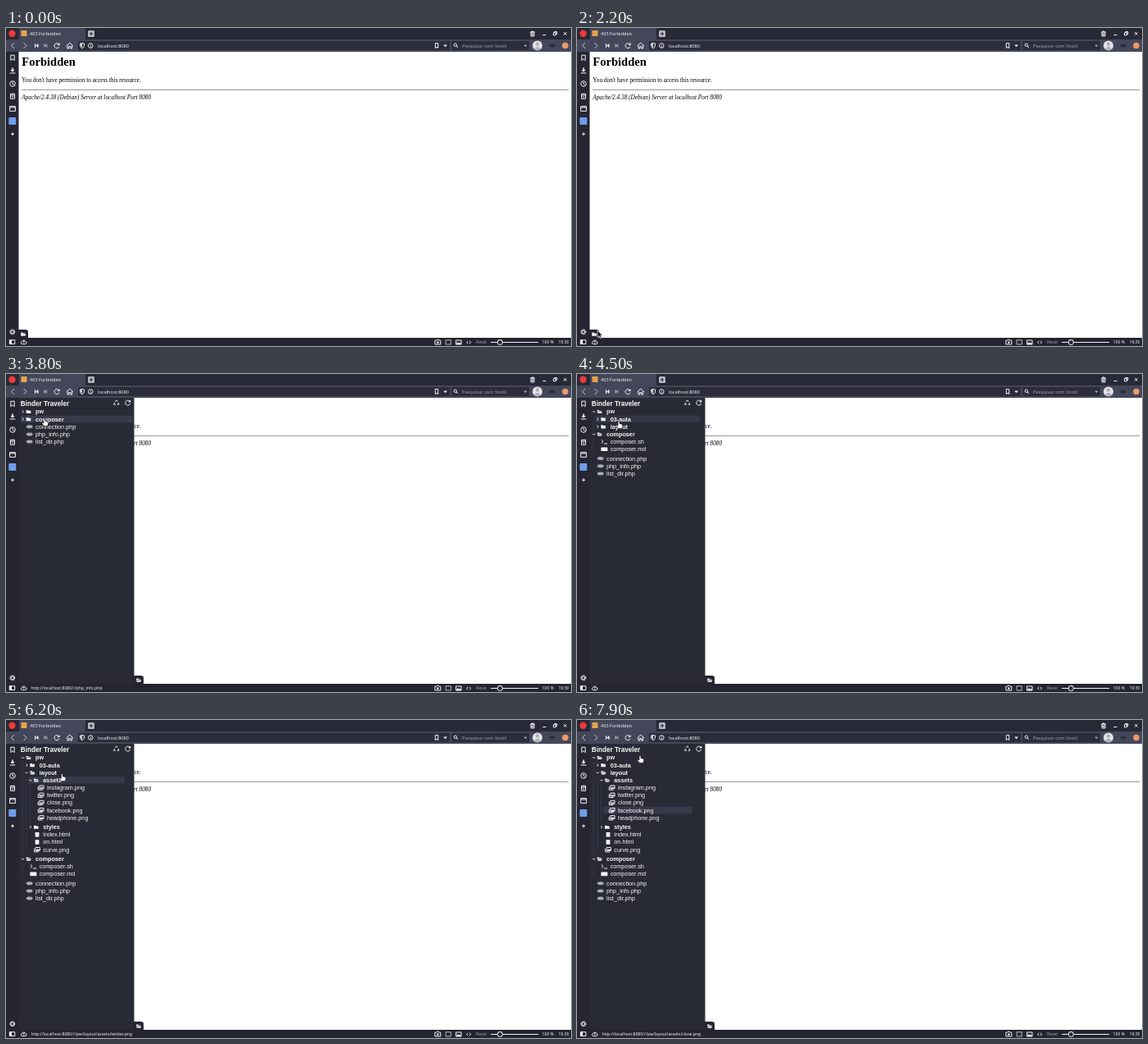
Animation, 690 px wide and 388 px high, one loop 8000 ms. Source, as an HTML page:

```html
<!DOCTYPE html>
<html lang="en">
<head>
<meta charset="utf-8">
<title>403 Forbidden</title>
<style>
html, body { margin: 0; width: 100%; height: 100%; overflow: hidden; background: #fff; }
svg { display: block; }
text { white-space: pre; }
.ui { font-family: "Noto Sans", sans-serif; font-size: 5.6px; fill: #f0f0f4; }
.small { font-size: 5.1px; }
.dim { fill: #a0a2ae; }
.page { font-family: "Liberation Serif", serif; font-size: 7.27px; fill: #000; }
.tree { font-family: "Liberation Sans", sans-serif; font-size: 7.27px; fill: #f8f8f2; }
.b { font-weight: bold; }
.line { fill: none; stroke: #f2f2f5; stroke-width: 1; }
.fill { fill: #f2f2f5; }
</style>
</head>
<body>
<svg width="690" height="388" viewBox="0 0 690 388">
  <rect width="690" height="388" fill="#fff"/>
  <g class="page">
    <text x="19.3" y="46" class="b" style="font-size:14.55px">Forbidden</text>
    <text x="19.3" y="65.6">You don't have permission to access this resource.</text>
    <path d="M19 75.5H687" stroke="#8c8c8c" stroke-width=".9"/>
    <text x="19.3" y="86.5" font-style="italic">Apache/2.4.38 (Debian) Server at localhost Port 8080</text>
  </g>
  <g id="panel"></g>
  <g id="chrome"></g>
  <text id="status" class="ui small" x="30.5" y="385"></text>
  <g id="cursor"></g>
</svg>
<script>
const $ = id => document.getElementById(id);
const line = (d, extra = '') => `<path class="line" d="${d}" ${extra}/>`;
const fill = (d, extra = '') => `<path class="fill" d="${d}" ${extra}/>`;
const rect = (x, y, w, h, color, r = 0) =>
  `<rect x="${x}" y="${y}" width="${w}" height="${h}" rx="${r}" fill="${color}"/>`;
const disc = (x, y, r, color) => `<circle cx="${x}" cy="${y}" r="${r}" fill="${color}"/>`;
const ring = (x, y, r) => `<circle class="line" cx="${x}" cy="${y}" r="${r}"/>`;
const label = (x, y, cls, s) => `<text x="${x}" y="${y}" class="${cls}">${s}</text>`;
const at = (x, y, s) => `<g transform="translate(${x} ${y})">${s}</g>`;

const reload = line('M2.4-1.7A3 3 0 1 0 2.9 1') + fill('M3.6-3.6V-.4H.4Z');
const cloud = line('M-2 2.3H2A1.6 1.6 0 0 0 2.2-.8A2.4 2.4 0 0 0-2.2-.8A1.6 1.6 0 0 0-2 2.3Z');
const folder = fill('M-2.8-2H-.6L.2-1.2H2.8V2.2H-2.8Z');
const openFolder = fill('M-2.8 1.6V-2H-.6L.2-1.2H2.3V-.5H-1.6Z') + fill('M-1.4 0H3.4L2.2 2.2H-2.6Z');
const picture = line('M-1.8-2.6H3.4V1.2H-1.8ZM-3.4-1.2V2.7H2', 'stroke-width=".9"') + fill('M-1.2.8L.2-1L1.2 0L2-.8L3 .8Z');

const fileIcons = {
  php: '<ellipse rx="3.9" ry="2" fill="#a9abb5"/>',
  html: rect(-2.4, -2.8, 4.8, 5.6, '#f2f2f5'),
  md: rect(-4, -2.3, 8, 4.6, '#f2f2f5', .5),
  sh: line('M-3.6-2.3L-1.3-.2L-3.6 1.9M-.4 2.4H3.8'),
  png: picture
};

function drawChrome() {
  const bar = '#282936', accent = '#44475a', field = '#2b2d3a';
  return rect(0, 0, 690, 14, bar) + rect(16, 0, 81, 14, accent) + rect(0, 14, 690, 15, accent)
    + rect(0, 29, 15.5, 349, '#252632') + rect(0, 378, 690, 10, '#242531')
    // tab strip
    + disc(7.5, 6.8, 4.2, '#ef3939') + rect(18.5, 3, 7, 7, '#e8a24c')
    + label(29, 9, 'ui', '403 Forbidden')
    + rect(100, 3, 8, 8, '#b9bac4', 1.5) + `<path d="M104 4.8V9.2M101.8 7H106.2" stroke="${bar}"/>`
    + at(643, 7, line('M-2-2H2V3H-2ZM-2.8-2H2.8M-1-3H1M-.7-.5V2M.7-.5V2', 'stroke-width=".7"'))
    + line('M655.5 8.5H659.5M668.5 5.8H671.5V8.8H668.5ZM669.8 5.8V4.5H672.8V7.4H671.5M681 5L684.6 8.6M684.6 5L681 8.6', 'stroke-width=".8"')
    // toolbar
    + line('M10 18L6.5 21.5L10 25M21.5 18L25 21.5L21.5 25', 'opacity=".75"')
    + fill('M35 19H36V24H35ZM39.5 19V24L36 21.5Z') + fill('M46.5 19V24L49.5 21.5ZM49.5 19H50.3V24H49.5Z', 'opacity=".6"')
    + at(62, 21.5, reload) + line('M73.8 21.8L77.8 18L81.8 21.8M75 21.2V25H76.8V22.5H78.8V25H80.6V21.2')
    + rect(88, 16, 454, 11, field, 1) + rect(544, 16, 95, 11, field, 1)
    + line('M93 18.4L95.5 19V21.5Q95.3 23.6 93 24.8Q90.7 23.6 90.5 21.5V19Z') + fill('M93 19.2V24L91.3 21.6V19.6Z')
    + ring(103.3, 21.5, 2.8) + fill('M102.9 19.7H103.7V20.4H102.9ZM102.9 21H103.7V23.4H102.9Z')
    + label(112, 23.6, 'ui', 'localhost:8080')
    + line('M524.3 18.5H527.7V24.7L526 23.2L524.3 24.7Z', 'stroke-width=".8"')
    + fill('M534.2 20.5H538.8L536.5 23.2Z')
    + ring(548.7, 20.7, 1.7) + line('M550 22L552 24')
    + label(557, 23.6, 'ui dim', 'Pesquisar com Vostil')
    + fill('M632.3 20.7H636.3L634.3 23Z', 'opacity=".7"')
    + disc(649, 21.5, 6, '#e6e6e8') + disc(649, 19.5, 2.2, '#aeb0b6') + fill('M644.8 25.4Q649 20 653.2 25.4Q649 29 644.8 25.4Z', 'style="fill:#aeb0b6"')
    + '<ellipse cx="667" cy="21.5" rx="3.7" ry="1.9" fill="#2d2f3d"/>' + disc(683, 21.5, 3.8, '#ed9a6b')
    // side icons
    + line('M5.8 33.2H10.2V39.6L8 37.7L5.8 39.6Z')
    + fill('M7.2 48.5H8.8V51H10.7L8 53.8L5.3 51H7.2ZM4.7 54.6H11.3V55.6H4.7Z')
    + ring(8, 68, 3.3) + line('M8 65.8V68.2L9.7 69.2', 'stroke-width=".8"')
    + line('M5.5 80.3H10.5V86.3H5.5ZM5.5 82H10.5M7 84H9.2', 'stroke-width=".9"')
    + line('M4.6 95.6H11.4V101.4H4.6ZM4.6 97H11.4', 'stroke-width=".9"')
    + rect(3.3, 109, 9, 9, '#6f9eea', 1)
    + line('M8 127.3V131.3M6 129.3H10', 'stroke-width=".8"')
    + '<circle class="line" cx="7.8" cy="370.8" r="2.8" stroke-dasharray="1.2 1" style="stroke-width:1.4"/>' + ring(7.8, 370.8, 1.8)
    // status bar
    + line('M4.3 380.7H10.8V385.5H4.3Z') + fill('M4.3 380.7H7V385.5H4.3Z')
    + at(21.7, 383.3, cloud) + fill('M21.7 381.7L23.3 383.5H20.1Z')
    + line('M523.8 381.3H525.4L526 380.3H528.6L529.2 381.3H530.8V386H523.8Z') + disc(527.3, 383.6, 1.3, '#f2f2f5')
    + line('M537 380.8H543.3V386H537Z', 'stroke-width=".7" opacity=".7"')
    + line('M549.5 381H556V386H549.5Z') + fill('M549.8 386L551.6 383L553.2 384.5L554.3 383.5L556 386Z')
    + line('M564.2 381.8L562.6 383.5L564.2 385.2M566 381.8L567.6 383.5L566 385.2')
    + label(574, 385, 'ui small dim', 'Reset')
    + fill('M592 382.9H650V383.9H592Z') + disc(603.3, 383.4, 3.4, '#f2f2f5') + disc(603.3, 383.4, 2.5, '#292a36')
    + label(654.6, 385, 'ui small', '100 %') + label(674.5, 385, 'ui small', '19:30');
}

// Folders: [name, time of opening, children]; files: name
const tree = [
  ['pw', 4200, [
    ['03-aula', Infinity, []],
    ['layout', 4800, [
      ['assets', 5600, ['instagram.png', 'twitter.png', 'close.png', 'facebook.png', 'headphone.png']],
      ['styles', Infinity, []],
      'index.html', 'on.html', 'curve.png']]]],
  ['composer', 3900, ['composer.sh', 'composer.md']],
  'connection.php', 'php_info.php', 'list_dir.php'
];

// [time, highlighted rows, strength]
const hovers = [
  [0, '', 0], [3300, 'pw', .6], [3500, 'connection.php', .8], [3700, 'php_info.php', .8], [3800, 'composer', .8],
  [4100, 'pw', .8], [4400, '03-aula', .6], [4600, 'layout', .8], [5100, 'styles', .6], [5300, 'assets', 1],
  [5700, 'instagram.png', .8], [5800, 'close.png', .8], [5900, 'facebook.png', 1], [6100, 'twitter.png', .7],
  [6200, 'assets', .7], [6300, 'pw', .5], [6500, 'instagram.png', .6], [6600, 'close.png', .7],
  [6700, 'facebook.png', .8], [6800, 'headphone.png', .8], [6900, 'facebook.png headphone.png', .3],
  [7000, 'index.html', .6], [7200, 'curve.png', .7], [7400, 'composer.sh', .7], [7600, 'headphone.png', .7],
  [7700, 'facebook.png', .75]
];
const assets = '/pw/layout/assets/';
const links = [
  [0, ''], [3500, '/connection.php'], [3700, '/php_info.php'], [3900, ''], [5700, assets + 'instagram.png'],
  [5800, assets + 'close.png'], [5900, assets + 'facebook.png'], [6100, assets + 'twitter.png'], [6300, ''],
  [6500, assets + 'instagram.png'], [6600, assets + 'close.png'], [6700, assets + 'facebook.png'],
  [6800, assets + 'headphone.png'], [7000, '/pw/layout/index.html'], [7200, '/pw/layout/curve.png'],
  [7400, '/composer/composer.sh'], [7600, assets + 'headphone.png'], [7700, assets + 'close.png']
];
// [time, x, y] of the pointer tip
const path = [
  [400, 560, 10], [700, 195, 238], [900, 138, 298], [1100, 8, 374], [1200, 32, 368], [1600, 18, 368], [1700, 18, 368],
  [1800, 22, 363], [1900, 28, 360], [2000, 28, 370], [2100, 28, 370], [2200, 25, 369], [2300, 22, 362],
  [2400, 20, 366], [2600, 20, 366], [2900, 9, 89], [3000, 7, 55], [3100, 13, 20], [3300, 32, 45],
  [3500, 42, 62], [3700, 46, 71], [3800, 47, 54], [3900, 47, 54], [4100, 44, 44], [4200, 44, 44],
  [4400, 50, 54], [4500, 51, 57], [4600, 50, 62], [4800, 50, 62], [5000, 55, 75], [5100, 54, 81],
  [5300, 49, 74], [5500, 47, 73], [5600, 47, 73], [5700, 53, 81], [5900, 61, 108], [6000, 61, 108],
  [6300, 72, 44], [6400, 74, 60], [6700, 64, 109], [6800, 60, 118], [6900, 58, 128],
  [7200, 52, 157], [7400, 52, 177], [7600, 58, 117], [7700, 62, 106], [7800, 65, 86], [7900, 77, 43]
];

const latest = (keys, t) => keys.filter(k => k[0] <= t).pop();

function pointer(t) {
  const a = latest(path, t);
  if (!a) return null;
  const b = path[path.indexOf(a) + 1] || a;
  const k = a === b ? 0 : (t - a[0]) / (b[0] - a[0]);
  return [a[1] + (b[1] - a[1]) * k, a[2] + (b[2] - a[2]) * k];
}

function drawTree(t) {
  const [, rows, strength] = latest(hovers, t);
  const hot = rows.split(' ');
  let y = 45.9, out = '';
  (function walk(nodes, level) {
    const dx = level * 4.65;
    for (const node of nodes) {
      const isFile = typeof node === 'string';
      const [name, opening, kids] = isFile ? [node] : node;
      const open = !isFile && t >= opening;
      if (hot.includes(name))
        out += `<rect x="${18 + dx}" y="${y - 4.4}" width="${136.5 - 2 * dx}" height="8.6" fill="#44475a" opacity="${strength * .75}"/>`;
      out += isFile
        ? at(28.7 + dx, y, fileIcons[name.split('.').pop()])
        : at(20.6 + dx, y, line(open ? 'M-1.5-.6L0 .9L1.5-.6' : 'M-.7-1.6L.8 0L-.7 1.6'))
          + at(27.5 + dx, y, open ? openFolder : folder);
      out += label(36 + dx, y + 2.5, isFile ? 'tree' : 'tree b', name);
      y += 9.17;
      if (open) {
        const top = y - 4;
        walk(kids, level + 1);
        out += line(`M${20.2 + dx} ${top}V${y - 5}`, 'style="stroke:#444756;stroke-width:.5"');
        if (typeof kids[kids.length - 1] === 'string') y += 2.2;
      }
    }
  })(tree, 0);
  return out;
}

function drawPanel(t) {
  const slide = [0, 45, 112, 141][Math.max(0, Math.min(3, (t - 2500) / 100))];
  const body = slide ? rect(15, 29, 141.5, 349, '#282a36')
    + `<text x="17.8" y="38.8" class="tree b" style="font-size:8.18px">Binder Traveler</text>`
    + at(134.8, 35.2, line('M-1.4-1.4L0-3.3L1.4-1.4M2.2-.2L3.2 2H1M-1 2H-3.2L-2.2-.2', 'stroke-width="1.1"'))
    + at(148.7, 35, reload) + drawTree(t) : '';
  const tab = '<path d="M156 368H165Q168 368 168 371V378H156Z" fill="#252632"/>'
    + at(162, 373.6, slide ? openFolder : folder);
  return at(slide - 141, 0, body + tab);
}

const arrow = '<path d="M0 0V8.6L2 6.8L3.4 9.7L5 9L3.6 6.2H6.3Z" fill="#111" stroke="#fff" stroke-width=".7"/>';
const hand = '<path d="M-1 .8Q0-.6 1 .8V3.4L4 4.2Q5 4.6 4.8 6L4 9.4H-.8L-3.2 6Q-3.4 4.6-2.2 5L-1 6Z" fill="#fff" stroke="#111" stroke-width=".7"/>';

function render(t) {
  $('panel').innerHTML = drawPanel(t);
  const link = latest(links, t)[1];
  $('status').textContent = link && 'http://localhost:8080//' + link;
  const p = pointer(t);
  $('cursor').innerHTML = p ? at(p[0], p[1], t > 2900 && p[0] > 17 && p[1] > 41 ? hand : arrow) : '';
}

$('chrome').innerHTML = drawChrome();
const start = performance.now();
let shown = -1;
function tick() {
  const t = Math.floor((performance.now() - start) % 8000 / 100) * 100;
  if (t !== shown) render(shown = t);
  requestAnimationFrame(tick);
}
tick();
</script>
</body>
</html>
```
